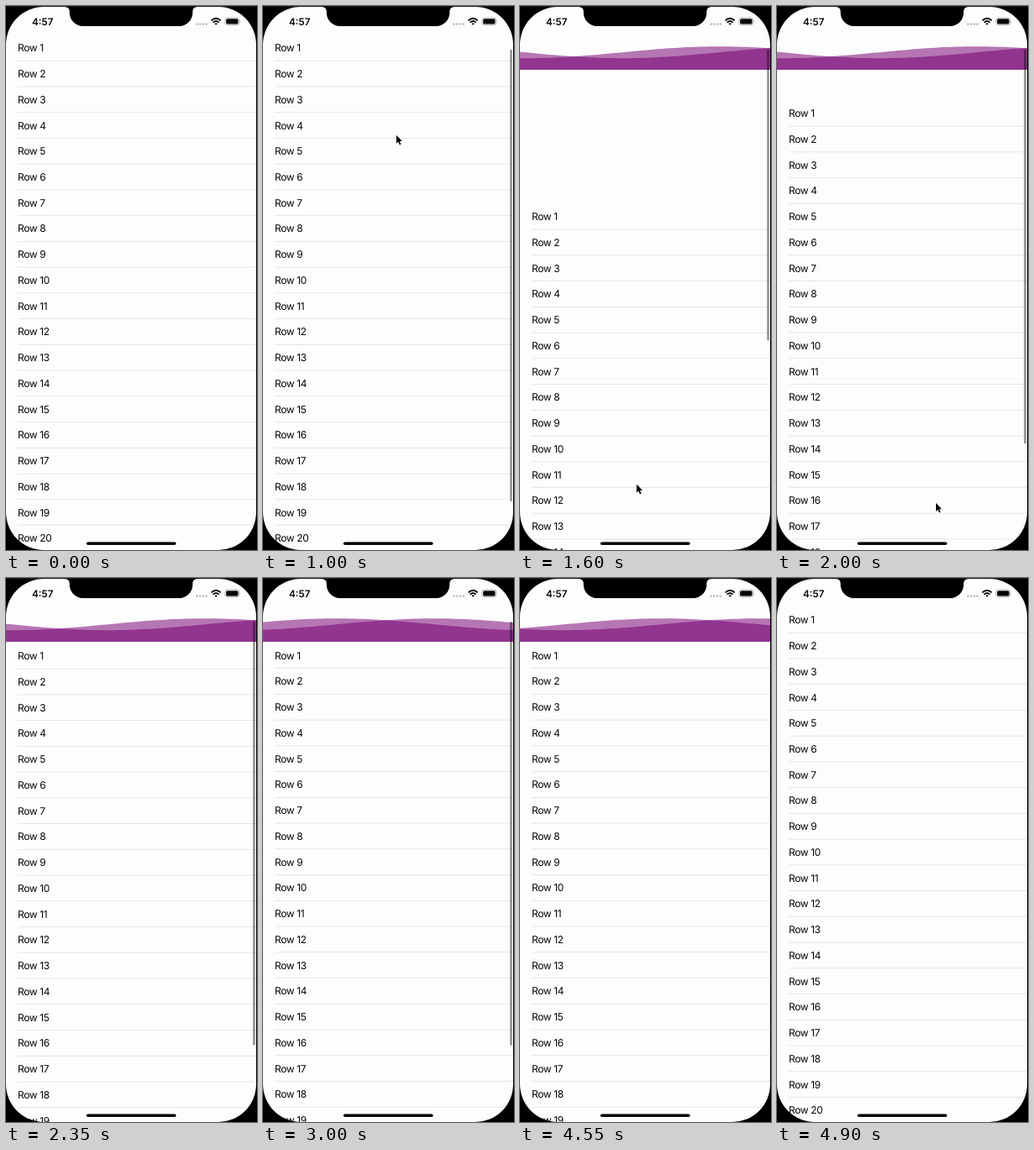
Recreate the animation shown at these times as an HTML page. Size 300 by 648 pixels, loop 5000 ms.

```html
<!DOCTYPE html>
<html lang="en">
<head>
<meta charset="utf-8">
<title>Wave pull to refresh</title>
<style>
  html, body { margin: 0; width: 100%; height: 100%; overflow: hidden; background: #000; }
  svg { display: block; width: 300px; height: 648px; }
  text { font-family: Inter, "Liberation Sans", sans-serif; fill: #060606; text-rendering: geometricPrecision; }
  #rows text { font-size: 12.1px; letter-spacing: -0.4px; }
  #clock { font-size: 11.8px; font-weight: 600; }
</style>
</head>
<body>
<svg viewBox="0 0 300 648">
  <defs>
    <clipPath id="overlap"><path id="clipWave"/></clipPath>
  </defs>
  <rect width="300" height="648" fill="#fdfdfd"/>

  <g id="waves">
    <path id="waveA" fill="#b676b4"/>
    <path id="waveB" fill="#b676b4"/>
    <path id="waveBoth" fill="#92358f" clip-path="url(#overlap)"/>
  </g>

  <g id="rows">
    <rect y="34" width="300" height="660" fill="#fdfdfd"/>
  </g>
  <rect id="bar" x="295.3" y="52" width="2.4" rx="1.2" fill="#000" fill-opacity=".45"/>

  <text id="clock" x="31" y="22.5">4:57</text>
  <g fill="#bdbdbd">
    <circle cx="228.2" cy="21.6" r="1.3"/>
    <circle cx="232" cy="21.6" r="1.3"/>
    <circle cx="235.8" cy="21.6" r="1.3"/>
    <circle cx="239.6" cy="21.6" r="1.3"/>
  </g>
  <g fill="none" stroke="#060606" stroke-width="1.8">
    <path d="M245.4 17.4Q251 12.2 256.6 17.4"/>
    <path d="M247.5 19.6Q251 16.4 254.5 19.6"/>
    <path d="M249.3 20.9Q251 19.5 252.7 20.9L251 22.8Z" fill="#060606" stroke="none"/>
  </g>
  <rect x="261.9" y="14" width="16.8" height="8.6" rx="2.5" fill="none" stroke="#a3a3a3" stroke-width=".8"/>
  <rect x="263.1" y="15.2" width="14.4" height="6.2" rx="1.5" fill="#060606"/>
  <path d="M279.6 17Q281 18.3 279.6 19.6Z" fill="#a3a3a3"/>
  <rect x="96.2" y="638.6" width="107" height="3.4" rx="1.7" fill="#000"/>

  <path fill="#000" fill-rule="evenodd" d="M0 0H300V648H0Z
    M0 46A45 45 0 0 1 45 1H70Q76 1 76 7V8A16 16 0 0 0 92 24H207A16 16 0 0 0 223 8V7Q223 1 229 1
    H254A45 45 0 0 1 299 46V603A45 45 0 0 1 254 648H45A45 45 0 0 1 0 603Z"/>
  <rect width="300" height="1" fill="#2e1825"/>

  <path id="cursor" d="M0 0V10L2.3 7.9L3.9 11.6L5.5 10.9L4 7.3H7Z"
    fill="#000" stroke="#fff" stroke-width=".9" paint-order="stroke"/>
</svg>
<script>
const $ = id => document.getElementById(id);
const NS = "http://www.w3.org/2000/svg";
const LOOP = 5000, STEP = 50;
const ROW = 30.74, REST = 42.4, TOUCH = 1000, RELEASE = 1800, CLOSE = 4560;
const WAVELENGTH = 465, WAVE_START = 2390, WAVE_SPEED = 0.247;

const rows = $("rows");
function add(tag, attrs, label = "") {
  const el = document.createElementNS(NS, tag);
  for (const k in attrs) el.setAttribute(k, attrs[k]);
  el.textContent = label;
  rows.append(el);
}
for (let i = 0; i < 21; i++) {
  add("text", { x: 14, y: 54.3 + i * ROW }, "Row " + (i + 1));
  add("rect", { x: 14, y: 64.9 + i * ROW, width: 286, height: 0.7, fill: "#dcdcdc" });
}

const clamp = v => Math.min(1, Math.max(0, v));
const smooth = v => v * v * (3 - 2 * v);

// Linear interpolation through [time, value, value...] keys
function track(keys, t, n = 1) {
  let i = 1;
  while (i < keys.length - 1 && keys[i][0] < t) i++;
  const a = keys[i - 1], b = keys[i];
  return a[n] + (b[n] - a[n]) * clamp((t - a[0]) / (b[0] - a[0]));
}

const drag = [[TOUCH, 0], [1100, 55], [1250, 208], [1400, 330], [1600, 416], [1700, 429]];
const enter = [[200, 293, 516], [300, 268, 420], [450, 200, 240], [600, 163, 150],
  [700, 159, 129], [850, 159.3, 138], [TOUCH, 159.4, 153.8]];
const leave = [[RELEASE, 138.8, 582.8], [2000, 190, 592], [2250, 304, 604]];

const rubber = x => 648 * (1 - 1 / (1 + 0.7 * x / 648));

function offsetAt(t) {
  if (t <= RELEASE) return rubber(track(drag, t));
  if (t < CLOSE) {
    const k = 0.0144 * (t - RELEASE);
    const excess = (rubber(429) - REST) * (1 + k) * Math.exp(-k);
    return REST + (t < 2900 ? excess : 0);
  }
  return REST * (1 - smooth(clamp((t - CLOSE) / 320)));
}

function wavePath(trough) {
  let d = "M0 76";
  for (let x = 0; x <= 300; x += 5) {
    const y = 55.2 + 7 * Math.cos((x - trough) / WAVELENGTH * 2 * Math.PI);
    d += `L${x} ${y.toFixed(2)}`;
  }
  return d + "L300 76Z";
}

function drawWaves(t) {
  const mid = 64 - WAVE_SPEED * Math.max(0, t - WAVE_START);
  const a = wavePath(mid + WAVELENGTH / 8);
  const b = wavePath(mid - WAVELENGTH / 8);
  $("waveA").setAttribute("d", a);
  $("waveB").setAttribute("d", b);
  $("waveBoth").setAttribute("d", a);
  $("clipWave").setAttribute("d", b);
  $("waves").setAttribute("visibility", t > TOUCH && t < 4900 ? "visible" : "hidden");
}

function drawBar(t, offset) {
  const shrink = Math.min(offset, REST) * 0.78 + Math.max(0, offset - REST);
  $("bar").setAttribute("height", 538 - shrink);
  $("bar").setAttribute("opacity", t < 950 ? 0 : 1 - clamp((t - 3480) / 250));
}

function drawCursor(t) {
  const pull = track(drag, t);
  let x = 159.4 - pull * 0.048, y = 153.8 + pull;
  if (t < TOUCH) { x = track(enter, t); y = track(enter, t, 2); }
  if (t > RELEASE) { x = track(leave, t); y = track(leave, t, 2); }
  $("cursor").setAttribute("transform", `translate(${x} ${y})`);
  $("cursor").setAttribute("visibility", t >= 200 && t < 2250 ? "visible" : "hidden");
}

function draw(now) {
  const t = Math.floor(now % LOOP / STEP) * STEP;
  const offset = offsetAt(t);
  rows.setAttribute("transform", `translate(0 ${offset.toFixed(2)})`);
  drawWaves(t);
  drawBar(t, offset);
  drawCursor(t);
}

let start;
function tick(now) {
  start ??= now;
  draw(now - start);
  requestAnimationFrame(tick);
}
draw(0);
requestAnimationFrame(tick);
</script>
</body>
</html>
```
